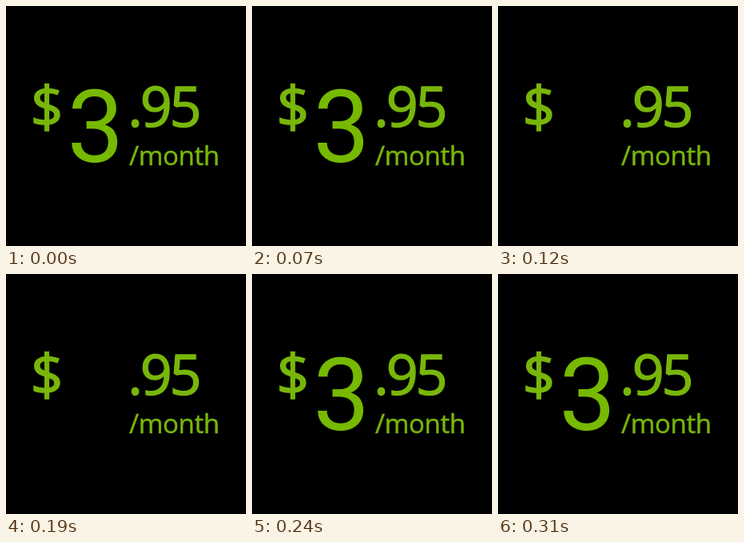
An HTML page that plays this animation: 300 px wide and 300 px high, repeating every 0.36 s.

```html
<!DOCTYPE html>
<html lang="en">
<head>
<meta charset="utf-8">
<title>Blinking price</title>
<style>
  html, body { margin: 0; width: 100%; height: 100%; overflow: hidden; background: #000; }
  svg { display: block; width: 300px; height: 300px; }
  text { fill: #76b900; }
  .soft text { fill: #78b60a; stroke: #78b60a; font-family: "Open Sans", "Noto Sans", sans-serif; }
  .soft { filter: blur(.6px); }
  .sign { font-size: 72px; stroke-width: 1.6px; }
  .cents { font-size: 70px; stroke-width: 1.5px; letter-spacing: -3.2px; }
  .period { font-size: 33px; stroke-width: .5px; letter-spacing: -.4px; }
  .digit { font: 126px Roboto, Arial, sans-serif; }
</style>
</head>
<body>
<svg viewBox="0 0 300 300">
  <g class="soft">
    <text class="sign" x="30.5" y="151.5">$</text>
    <text class="cents" x="152.3" y="151">.95</text>
    <text class="period" x="154" y="199">/month</text>
  </g>
  <text class="digit" id="digit" x="76.5" y="194.5">3</text>
</svg>
<script>
  const steps = [[0, 1], [120, 0], [240, 1]];
  const loop = 360;
  const frames = steps.map(([time, opacity]) => ({ offset: time / loop, opacity, easing: "step-end" }));
  frames.push({ offset: 1, opacity: 1 });
  document.getElementById("digit").animate(frames, { duration: loop, iterations: Infinity });
</script>
</body>
</html>
```
